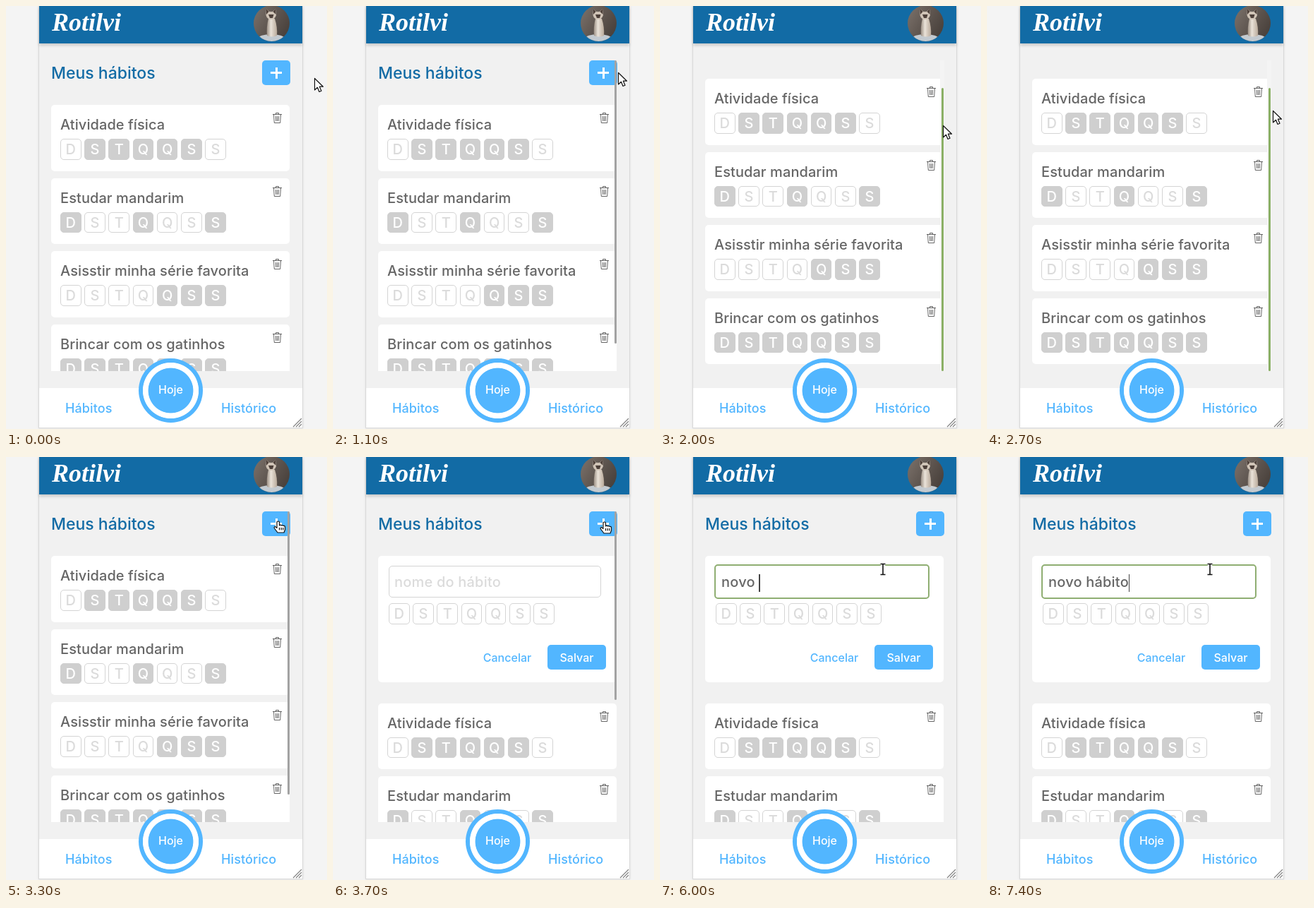
Animation, 455 px wide and 599 px high, one loop 8000 ms. Source, as an HTML page:

```html
<!DOCTYPE html>
<html lang="pt">
<head>
<meta charset="utf-8">
<title>Meus hábitos</title>
<style>
html, body { margin: 0; width: 455px; height: 599px; overflow: hidden; background: #f4f4f4; }
body { position: relative; font: 450 20px Inter, sans-serif; color: #666; }
div, svg { position: absolute; box-sizing: border-box; }
svg { overflow: visible; }
#phone { left: 46px; top: -4px; width: 375px; height: 602px; background: #f1f1f1; border: 1px solid #d9d9d9; box-shadow: 0 0 3px rgba(0,0,0,.1); }
#head { left: 47px; top: 0; width: 373px; height: 53px; background: #126ba5; box-shadow: 0 3px 4px rgba(0,0,0,.16); }
#logo { left: 18px; top: 0; font: italic bold 36px/47px "Liberation Serif", serif; color: #fff; }
#list { left: 64px; top: 77px; width: 339px; height: 440px; overflow: hidden; }
#page { left: 0; top: 0; width: 339px; height: 700px; }
#title { left: 0; top: 0; font-size: 23px; line-height: 36px; color: #126ba5; }
#plus { left: 299px; top: 0; width: 40px; height: 35px; border-radius: 5px; background: #52b6ff; }
#plus::before, #plus::after { content: ""; position: absolute; background: #fff; left: 12px; top: 16px; width: 16px; height: 3px; }
#plus::after { left: 18.5px; top: 9.5px; width: 3px; height: 16px; }
.card { left: 0; width: 338px; height: 93.5px; border-radius: 5px; background: #fff; }
.name { left: 13px; top: 13px; line-height: 30px; white-space: nowrap; letter-spacing: .08px; }
.day { width: 29.5px; height: 29.5px; border: 1px solid #d4d4d4; border-radius: 5px; line-height: 28px; text-align: center; color: #dbdbdb; background: #fff; }
.on { background: #cfcfcf; border-color: #cfcfcf; color: #fff; }
#form { top: 63px; height: 179px; }
#field { left: 15px; top: 14px; width: 301px; height: 45px; border: 1px solid #d4d4d4; border-radius: 5px; }
#field.focus { left: 13px; top: 12px; width: 305px; height: 49px; border: 2px solid #8fae72; }
#hint, #typed { left: 23px; top: 22px; line-height: 30px; white-space: pre; letter-spacing: .2px; }
#hint { color: #dbdbdb; }
#caret { display: inline-block; width: 1.5px; height: 25px; background: #444; vertical-align: -7px; margin-right: -2px; }
.btn { top: 126px; height: 35px; font-size: 16px; line-height: 36px; text-align: center; }
#cancel { left: 142px; width: 82px; color: #52b6ff; }
#save { left: 240px; width: 83px; border-radius: 5px; background: #52b6ff; color: #fff; }
#track { left: 333px; top: 0; width: 6px; height: 440px; background: #f4f4f4; }
#thumb { left: 335px; width: 3px; border-radius: 2px; }
#nav { left: 47px; top: 541px; width: 373px; height: 56px; background: #fff; font-size: 18px; line-height: 57px; letter-spacing: .1px; color: #52b6ff; }
#today { left: 188px; top: 499px; width: 91px; height: 91px; border-radius: 50%; background: radial-gradient(circle, #52b6ff 31.5px, #fff 32.3px 39.2px, #52b6ff 40px); color: #fff; font-size: 16px; line-height: 89px; text-align: center; }
#tip { left: 314px; top: 179px; width: 170px; height: 36px; border: 1px solid #d5c98c; background: #fce9a2; color: #333; font: 13.2px/35px "Noto Sans", sans-serif; padding-left: 9px; white-space: nowrap; }
</style>
</head>
<body>
<div id="phone"></div>
<div id="head">
  <div id="logo">Rotilvi</div>
  <svg style="left:303.5px;top:-1px" width="51" height="51" viewBox="0 0 51 51">
    <defs>
      <clipPath id="disc"><circle cx="25.5" cy="25.5" r="25.5"/></clipPath>
      <linearGradient id="wall" x2="1" y2=".6"><stop stop-color="#7d736c"/><stop offset=".5" stop-color="#625953"/><stop offset="1" stop-color="#4a423d"/></linearGradient>
      <linearGradient id="fur" x2="1"><stop stop-color="#9c9085"/><stop offset=".4" stop-color="#e9e2d8"/><stop offset="1" stop-color="#b9aa9b"/></linearGradient>
    </defs>
    <g clip-path="url(#disc)">
      <rect width="51" height="51" fill="url(#wall)"/>
      <ellipse cx="25" cy="47" rx="19" ry="6" fill="#c3cad0"/>
      <path d="M21 19Q18 30 19 43Q26 46 33 43Q34 31 30 19Z" fill="url(#fur)"/>
      <path d="M18 5L22 9H27L31 5L32 14Q30 20 25 20Q19 20 17.500 14Z" fill="#cfc3b6"/>
      <path d="M18 5L21.500 9L18 13ZM31 5L27.500 9L31.500 13ZM21 13H28.500L27 18H23Z" fill="#4d403a"/>
    </g>
  </svg>
</div>
<div id="list">
  <div id="page">
    <div id="title">Meus hábitos</div>
    <div id="plus"></div>
    <div id="form" class="card">
      <div id="field"></div>
      <div id="hint">nome do hábito</div>
      <div id="typed"><span id="text"></span><span id="caret"></span></div>
      <div id="cancel" class="btn">Cancelar</div>
      <div id="save" class="btn">Salvar</div>
    </div>
  </div>
  <div id="track"></div>
  <div id="thumb"></div>
</div>
<div id="nav">
  <div style="left:37px">Hábitos</div>
  <div style="left:258px">Histórico</div>
</div>
<div id="today">Hoje</div>
<svg style="left:407px;top:584px" width="13" height="13"><path d="M0 12L12 0M4 12L12 4M8 12L12 8" stroke="#858585" stroke-width="1.2"/></svg>
<div id="tip">Please fill out this field.</div>
<svg id="cursor" style="left:0;top:0" width="1" height="1" stroke-linejoin="round">
  <path id="arrow" d="M.5 .5V17L4.500 13.300L7 19.500L10 18.200L7.400 12.200H12.500Z" fill="#fff" stroke="#111" stroke-width="1.2"/>
  <g id="hand" fill="#fff" stroke="#111" stroke-width="1.2">
    <path d="M-2 1Q0-1 1.500 1V6Q3 4.500 4.500 6Q6 5 7.200 6.500Q9.300 6 9.500 8V12L8 16H-1L-5.500 10Q-6.500 8-4.500 7.500L-2 9.500Z"/>
    <path d="M1.500 9V12.500M4.200 9V12.500M6.800 9V12.500" fill="none"/>
  </g>
  <g id="beam" fill="none">
    <path d="M-3.500-7.500H3.500M-3.500 7.500H3.500M0-7.500V7.500" stroke="#fff" stroke-width="4"/>
    <path d="M-3.500-7.500H3.500M-3.500 7.500H3.500M0-7.500V7.500" stroke="#111" stroke-width="1.6"/>
  </g>
</svg>
<script>
const $ = id => document.getElementById(id);
const LOOP = 8000, PITCH = 103.5, FORM_SHIFT = 208.5;

const days = (mask, left, top) => [...'DSTQQSS'].map((d, i) =>
  `<div class="day${mask[i] === '1' ? ' on' : ''}" style="left:${left + i * 34.22}px;top:${top}px">${d}</div>`).join('');

const trash = `<svg style="left:314px;top:11px" width="13" height="15" fill="none" stroke="#555" stroke-width=".9">
  <path d="M0 2.500H13M4.500 2.500V.5H8.500V2.500M1.500 2.500L2.300 14.500H10.700L11.500 2.500M4.400 5L4.700 12M6.500 5V12M8.600 5L8.300 12"/></svg>`;

const cards = [
  ['Atividade física', '0111110'],
  ['Estudar mandarim', '1001001'],
  ['Asisstir minha série favorita', '0000111'],
  ['Brincar com os gatinhos', '1111111']
].map(([name, mask]) => {
  const card = document.createElement('div');
  card.className = 'card';
  card.innerHTML = `<div class="name">${name}</div>${days(mask, 13, 48)}${trash}`;
  $('page').append(card);
  return card;
});
$('form').insertAdjacentHTML('beforeend', days('0000000', 15, 67));

// time, x, y, cursor shape
const moves = [
  [0, 437, 102, 'arrow'], [100, 432, 103, 'arrow'], [200, 424, 101, 'arrow'], [300, 416, 98, 'arrow'],
  [400, 411, 95, 'arrow'], [1100, 404, 94, 'arrow'], [1200, 391, 95, 'hand'], [1300, 411, 95, 'arrow'],
  [1500, 407, 99, 'arrow'], [1600, 402, 103, 'arrow'], [1800, 402, 105, 'arrow'], [1900, 401, 128, 'arrow'],
  [2000, 401, 169, 'arrow'], [2100, 402, 192, 'arrow'], [2200, 402, 212, 'arrow'], [2300, 402, 228, 'arrow'],
  [2600, 403, 190, 'arrow'], [2700, 405, 148, 'arrow'], [3300, 386, 91, 'hand'], [3700, 385, 92, 'hand'],
  [3800, 368, 108, 'arrow'], [3900, 345, 128, 'arrow'], [4000, 326, 146, 'arrow'], [4100, 317, 158, 'beam'],
  [4200, 316, 159, 'beam']
];
const scrolls = [[0, 0], [1900, 21], [2000, 37], [3300, 0]];
const typing = [
  [0, ''], [5400, 'n'], [5600, 'no'], [5800, 'nov'], [5900, 'novo'], [6000, 'novo '], [6200, 'novo h'],
  [6400, 'novo h´'], [6600, 'novo há'], [6800, 'novo háb'], [7100, 'novo hábi'], [7200, 'novo hábit'],
  [7400, 'novo hábito']
];

const at = (table, t) => table.findLast(row => row[0] <= t);
const within = (t, a, b) => t >= a && t < b;
const clamp = v => Math.min(1, Math.max(0, v));
const show = (id, on) => { $(id).style.visibility = on ? 'visible' : 'hidden'; };

function draw(now) {
  const t = Math.floor((now % LOOP) / 100) * 100;

  const [, x, y, shape] = at(moves, t);
  $('cursor').style.transform = `translate(${x}px,${y}px)`;
  for (const id of ['arrow', 'hand', 'beam']) show(id, id === shape);

  const open = t >= 3700, scroll = at(scrolls, t)[1];
  $('page').style.top = -scroll + 'px';
  $('form').style.display = open ? 'block' : 'none';
  cards.forEach((c, i) => { c.style.top = 63 + i * PITCH + (open ? FORM_SHIFT : 0) + 'px'; });

  const thumb = $('thumb').style;
  thumb.top = scroll * 39 / 37 + 'px';
  thumb.height = (open ? 267 : 401) + 'px';
  thumb.background = within(t, 1900, 3300) ? '#8bb066' : '#a3a3a3';
  thumb.opacity = t < 5600 ? clamp(t / 400) : clamp((6000 - t) / 500);
  show('track', within(t, 1500, 3300));

  const text = at(typing, t)[1];
  $('field').className = t >= 4400 ? 'focus' : '';
  $('text').textContent = text;
  $('hint').style.display = text ? 'none' : 'block';
  $('typed').style.display = t >= 4400 ? 'block' : 'none';

  show('tip', within(t, 5200, 5400));
  $('tip').style.opacity = t < 5300 ? 1 : .5;
}

const start = performance.now();
function tick() {
  draw(performance.now() - start);
  requestAnimationFrame(tick);
}
tick();
</script>
</body>
</html>
```
